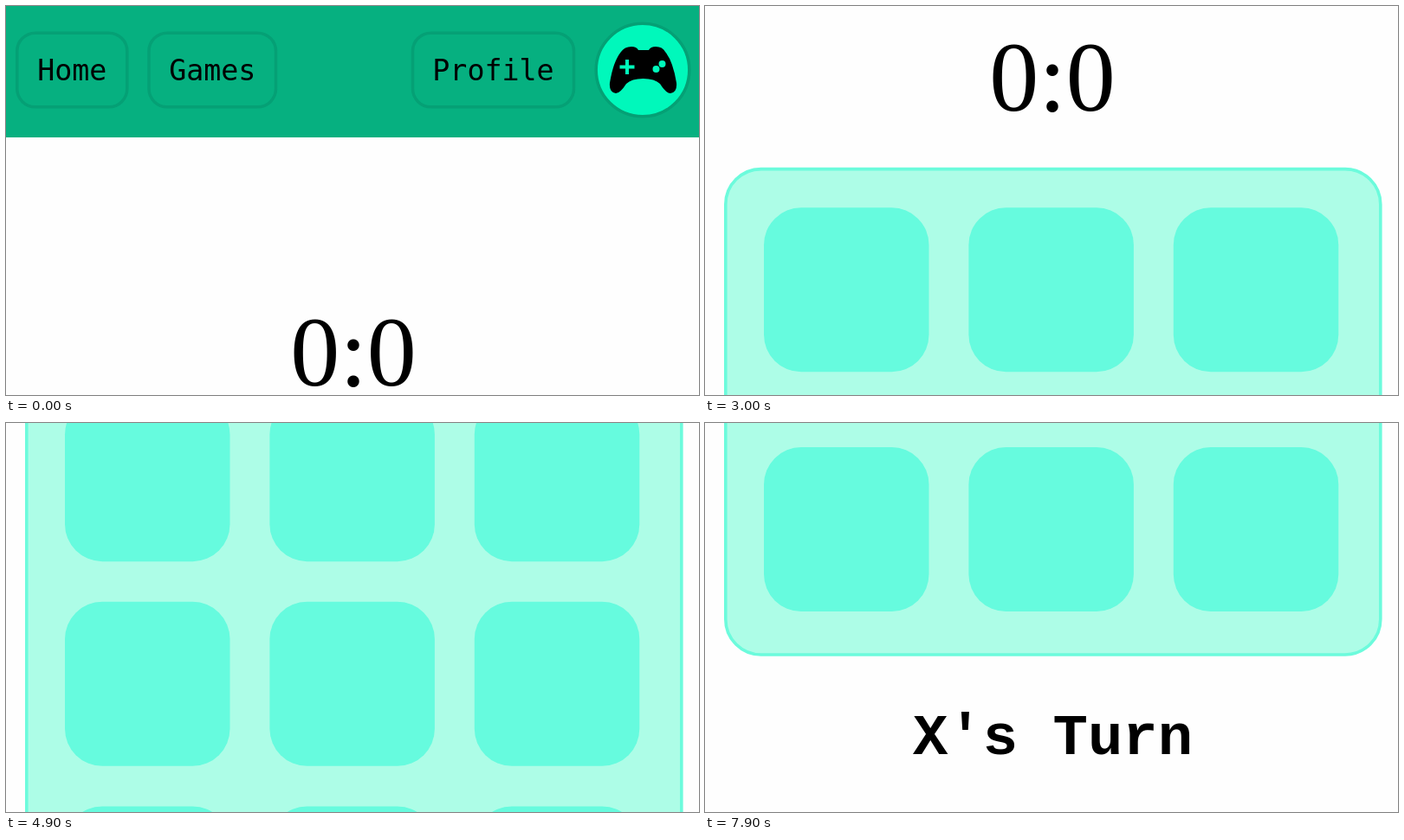
Recreate the animation shown at these times as an HTML page. Size 800x450 px, loop 8000 ms.

```html
<!DOCTYPE html>
<html lang="en">
<head>
<meta charset="utf-8">
<title>Scrolling game page</title>
<style>
  html, body { margin: 0; width: 100%; height: 100%; overflow: hidden; background: #fefefe; }
  svg { display: block; width: 800px; height: 450px; }
  text { text-anchor: middle; }
  .nav text { font: 33.3px "DejaVu Sans Mono", monospace; }
  .nav rect, .nav circle { stroke: #05a075; stroke-width: 3.5; }
  .score { font: 114px "Liberation Serif", serif; }
  .turn { font: bold 67.3px "Liberation Mono", monospace; }
</style>
</head>
<body>
<svg viewBox="0 0 800 450">
  <g id="page">
    <rect width="800" height="152" fill="#06b080"/>
    <g class="nav">
      <g id="buttons"></g>
      <circle cx="735" cy="74" r="53.8" fill="#00f8bb"/>
      <path d="M710 53Q714 47 722 47Q728 47 730 51H742Q744 47 750 47Q758 47 761 53
               Q770 64 774 89Q775 100 767 101Q762 101 755 90Q749 84 735.5 84
               Q722 84 716 90Q709 101 704 101Q696 100 697 89Q701 64 710 53Z"/>
      <path d="M708.5 70.5h17M717 62v17" stroke="#00f8bb" stroke-width="4"/>
      <path d="M750.5 73h0M757.5 67h0" stroke="#00f8bb" stroke-width="8" stroke-linecap="round"/>
    </g>
    <text class="score" x="401" y="438.5">0:0</text>
    <rect x="23.8" y="506.3" width="756" height="758" rx="41" fill="#adfde7" stroke="#6cfbdc" stroke-width="3.6"/>
    <g id="cells" fill="#66fbde"></g>
    <text class="turn" x="401.5" y="1379">X's Turn</text>
  </g>
</svg>
<script>
const $ = id => document.getElementById(id);

const button = (label, x, w) =>
  `<rect x="${x}" y="31.2" width="${w}" height="85.6" rx="21" fill="none"/>
   <text x="${x + w / 2}" y="86">${label}</text>`;
$('buttons').innerHTML =
  button('Home', 12.8, 127) + button('Games', 165, 146.5) + button('Profile', 469.5, 186);

for (let i = 0; i < 9; i++) {
  const x = 68 + 236.4 * (i % 3), y = 551 + 236.7 * Math.floor(i / 3);
  $('cells').innerHTML += `<rect x="${x}" y="${y}" width="190.5" height="190" rx="43"/>`;
}

const LOOP = 8000, STEP = 100, RAMP = 1412, SPEED = 0.1385;

// Uniform acceleration during the ramp, then constant speed.
const scroll = t => t < RAMP ? SPEED * t * t / (2 * RAMP) : SPEED * (t - RAMP / 2);

const start = performance.now();
function draw() {
  const t = (performance.now() - start) % LOOP;
  const y = scroll(Math.floor(t / STEP) * STEP);
  $('page').setAttribute('transform', `translate(0 ${-y})`);
  requestAnimationFrame(draw);
}
draw();
</script>
</body>
</html>
```
